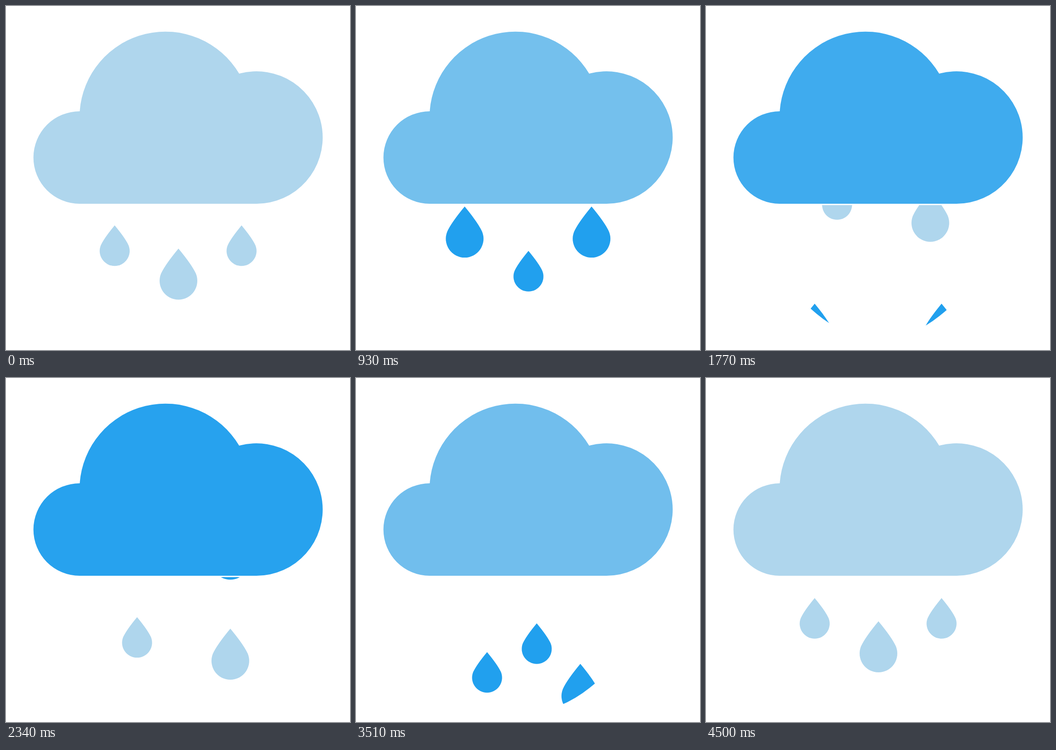
These frames come from a looping animation (748 px wide and 748 px high, 4.53 s). An HTML page:

```html
<!DOCTYPE html>
<html lang="en">
<head>
<meta charset="utf-8">
<title>Rain cloud</title>
<style>
  html, body { margin: 0; height: 100%; overflow: hidden; background: #fff; }
  svg { display: block; width: 100%; height: 100%; }
</style>
</head>
<body>
<svg viewBox="0 0 748 748">
  <defs>
    <path id="drop" d="M0 0Q29.3 35.3 38 54.6A41 41 0 1 1 -38 54.6Q-29.3 35.3 0 0Z"/>
    <clipPath id="sky"><path d="M177 433H577V605.3Q377 845.3 177 605.3Z"/></clipPath>
  </defs>
  <path id="cloud" d="M160 430A100.5 100.5 0 0 1 160.3 229A186.7 186.7 0 0 1 507 147A144 144 0 1 1 543.5 430Z"/>
  <g id="rain" clip-path="url(#sky)"></g>
</svg>
<script>
const LOOP = 4530, STEP = 30;
const CYCLE = 4494;      // ms for one full pass of colour and rain
const SPEED = 0.2514;    // px per ms
const LIGHT = [175, 214, 237], DARK = [33, 160, 238];
const SMALL = 0.795, LARGE = 1;
const rgb = c => `rgb(${c.map(Math.round)})`;

// x, height of the tip at time 0, scale, colour
const drops = [
  [236.3, 477, SMALL, LIGHT], [512.2, 477, SMALL, LIGHT], [375, 527.5, LARGE, LIGHT],
  [236.3, 202.3, LARGE, DARK], [512.2, 202.3, LARGE, DARK], [375, 298.7, SMALL, DARK],
  [285, -68.4, SMALL, LIGHT], [487.8, -43.3, LARGE, LIGHT],
  [285, -286.5, SMALL, DARK], [393, -349, SMALL, DARK], [487.8, -260.8, LARGE, DARK]
].map(([x, y, scale, color]) => {
  const node = document.createElementNS('http://www.w3.org/2000/svg', 'use');
  node.setAttribute('href', '#drop');
  node.setAttribute('fill', rgb(color));
  document.getElementById('rain').append(node);
  return { x, y, scale, node };
});
const cloud = document.getElementById('cloud');

function draw(now) {
  const t = Math.floor(now % LOOP / STEP) * STEP;
  const mix = 1 - Math.abs(1 - 2 * (t % CYCLE) / CYCLE);
  cloud.setAttribute('fill', rgb(LIGHT.map((c, i) => c + (DARK[i] - c) * mix)));
  for (const { x, y, scale, node } of drops) {
    const tip = (y + SPEED * t) % (SPEED * CYCLE);
    node.setAttribute('transform', `translate(${x} ${tip}) scale(${scale})`);
  }
}

let start;
function tick(now) {
  start ??= now;
  draw(now - start);
  requestAnimationFrame(tick);
}
draw(0);
requestAnimationFrame(tick);
</script>
</body>
</html>
```
